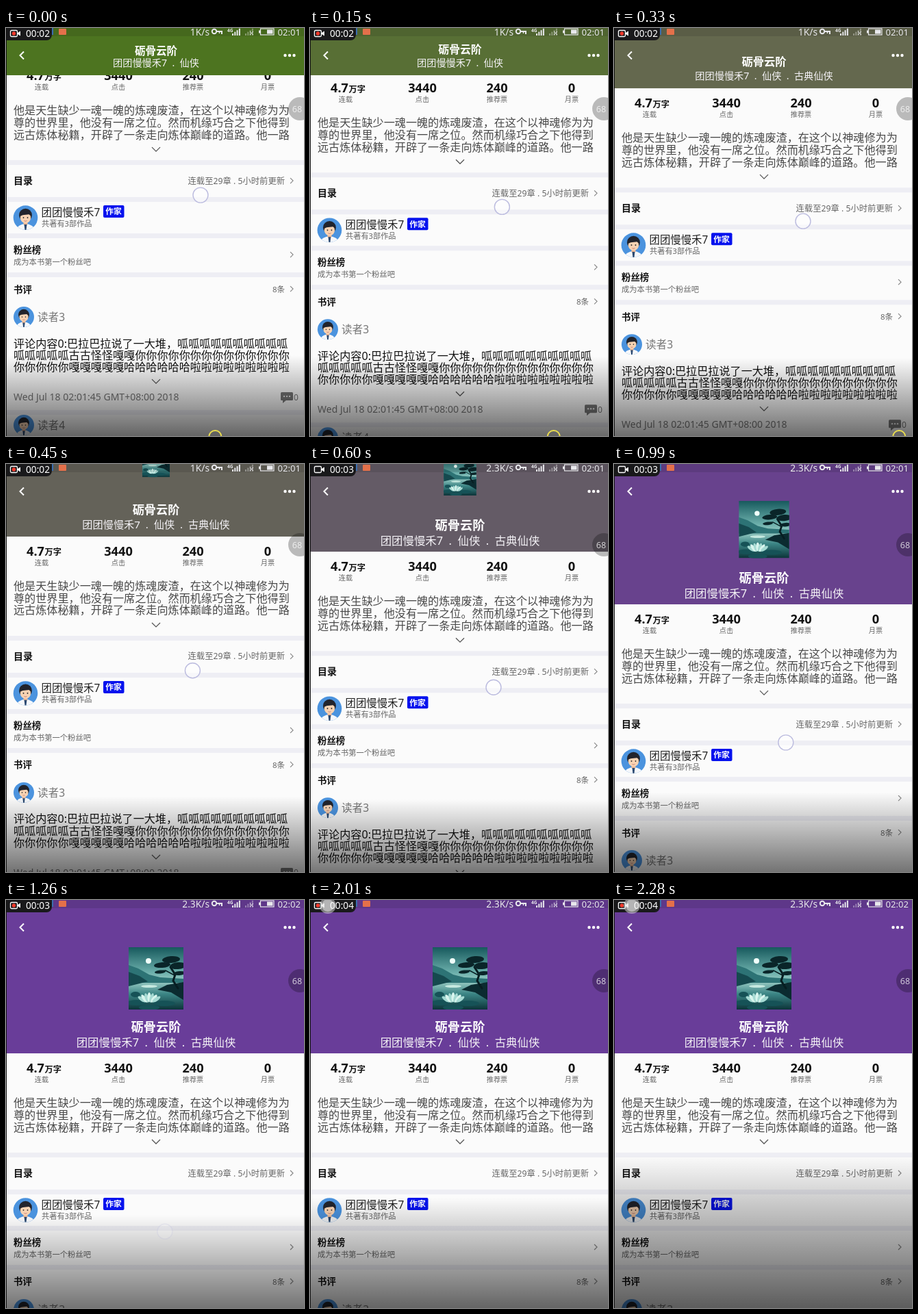
Write an HTML page with a canvas that moves like this. It is 435x596 px and loops after 5580 ms.

```html
<!DOCTYPE html>
<html lang="zh-CN">
<head>
<meta charset="utf-8">
<style>
html, body { margin: 0; width: 100%; height: 100%; overflow: hidden; background: #fbfbfb; }
canvas { display: block; }
</style>
</head>
<body>
<canvas id="stage" width="435" height="596"></canvas>
<script>
const W = 435, H = 596, LOOP = 5580;
const c = document.getElementById('stage').getContext('2d');
const FONT = '"Noto Sans", "Noto Sans CJK SC", "Noto Sans CJK JP", sans-serif';
const TITLE = '砺骨云阶', AUTHOR = '团团慢慢禾7';

// Keyed motion: [time or position, value or list of values]
const SCROLL = [[0, 48], [330, 88], [600, 128], [840, 173], [1080, 224]];
const FINGER = [[0, [284, 244, 1]], [330, [276, 282, 1]], [600, [268, 326, 1]],
  [840, [259, 371, 1]], [1080, [246, 428, 1]], [1260, [232, 484, .25]], [1300, [229, 492, 0]]];
const SHADE = [[0, [478, .6]], [330, [482, .56]], [600, [490, .53]], [840, [490, .54]], [1260, [460, .54]],
  [1980, [455, .56]], [2010, [435, .6]], [2280, [373, .63]]];
const HEADER = [[48, [77, 116, 32]], [88, [100, 104, 78]], [128, [100, 91, 102]],
  [173, [101, 74, 121]], [224, [105, 61, 153]]];
// title size, title rise, subtitle size, subtitle rise
const TITLES = [[48, [15.5, 36, 14.2, 18]], [88, [16.3, 39, 14.2, 18]], [128, [18.2, 39, 16.4, 16]]];

function at(keys, x) {
  const i = keys.findIndex(k => k[0] > x);
  if (i === 0) return keys[0][1];
  if (i < 0) return keys[keys.length - 1][1];
  const [x0, a] = keys[i - 1], [x1, b] = keys[i];
  const mix = (p, q) => p + (q - p) * (x - x0) / (x1 - x0);
  return Array.isArray(a) ? a.map((v, n) => mix(v, b[n])) : mix(a, b);
}

// y is the visual middle of the line
function text(str, x, y, size, color, weight = 400, align = 'left') {
  c.font = `${weight} ${size}px ${FONT}`;
  c.textAlign = align;
  c.fillStyle = color;
  c.fillText(str, x, y + size * .37);
}

function box(x, y, w, h, color, r = 0) {
  c.fillStyle = color;
  c.beginPath();
  c.roundRect(x, y, w, h, r);
  c.fill();
}

function oval(x, y, rx, ry, color, turn = 0) {
  c.fillStyle = color;
  c.beginPath();
  c.ellipse(x, y, rx, ry, turn, 0, 7);
  c.fill();
}

function ring(x, y, r, color, width) {
  c.strokeStyle = color;
  c.lineWidth = width;
  c.beginPath();
  c.arc(x, y, r, 0, 7);
  c.stroke();
}

function line(points, color, width) {
  c.strokeStyle = color;
  c.lineWidth = width;
  c.beginPath();
  points.forEach(p => c.lineTo(...p));
  c.stroke();
}

function poly(points, color) {
  c.fillStyle = color;
  c.beginPath();
  points.forEach(p => c.lineTo(...p));
  c.fill();
}

const downArrow = y => line([[213, y - 3], [219, y + 3], [225, y - 3]], '#555', 1.3);
const rightArrow = y => line([[415, y - 4], [419, y], [415, y + 4]], '#888', 1.2);
const divider = y => box(0, y, W, 7, '#eeeef4');

function avatar(x, y, r) {
  c.save();
  c.translate(x, y);
  c.scale(r / 18, r / 18);
  oval(0, 0, 18, 18, '#4b93de');
  c.clip();
  oval(0, 18, 13, 9, '#f6f8fb');
  box(-3, 4, 6, 7, '#eeb995', 2);
  poly([[-2, 10], [2, 10], [1, 18], [-1, 18]], '#2c4a72');
  oval(0, -4, 9.5, 9.5, '#22242c');
  oval(0, 0, 7.8, 8, '#f8d3b3');
  poly([[-9, -2], [-8, -9], [5, -10], [9, -2], [5, -5], [-4, -4]], '#22242c');
  oval(-3, 0, .9, 1.1, '#333');
  oval(3, 0, .9, 1.1, '#333');
  line([[-2, 4.5], [0, 5.2], [2, 4.5]], '#b66', .8);
  c.restore();
}

function cover(y, scale) {
  c.save();
  c.translate(219, y);
  c.scale(scale, scale);
  c.translate(-40, -45.5);
  c.beginPath();
  c.rect(0, 0, 80, 91);
  c.clip();
  const sky = c.createLinearGradient(0, 0, 0, 91);
  [[0, '#17595d'], [.4, '#6aaeaa'], [.55, '#9acbc4'], [.75, '#3b8585'], [1, '#0c3439']]
    .forEach(s => sky.addColorStop(...s));
  box(0, 0, 80, 91, sky);
  oval(29, 20, 4, 4, '#f0fffa');
  poly([[0, 26], [14, 31], [30, 40], [46, 44], [80, 46], [80, 52], [0, 52]], '#2d7375');
  poly([[0, 36], [16, 42], [28, 50], [0, 57]], '#15494e');
  oval(30, 57, 12, 2, '#c5e8df');
  poly([[80, 51], [56, 55], [42, 62], [62, 66], [80, 77]], '#0b2b30');
  c.lineCap = 'round';
  line([[72, 60], [65, 49], [68, 40], [61, 29]], '#071d21', 3);
  line([[67, 41], [54, 34], [46, 35]], '#071d21', 1.5);
  [[49, 26, 12, 4], [62, 18, 13, 5], [72, 27, 12, 5], [46, 36, 8, 2.5], [74, 38, 9, 3]]
    .forEach(l => oval(...l, '#0a2529', -.08));
  [[12, 81, 14], [52, 82, 16], [30, 88, 15], [10, 69, 7]].forEach(([x, v, r]) => oval(x, v, r, 4, '#165257'));
  for (let i = -3; i <= 3; i++)
    oval(30 + i * 3.5, 73 + Math.abs(i), 2.6, 7, i % 2 ? '#a5dad3' : '#d8f5ee', i * .32);
  c.restore();
}

function content(s) {
  c.save();
  c.translate(0, s);
  [['3440', '点击', 164], ['240', '推荐票', 273], ['0', '月票', 382]].forEach(([n, label, x]) => {
    text(n, x, 21, 18.2, '#111', 700, 'center');
    text(label, x, 38, 10.2, '#666', 400, 'center');
  });
  text('4.7', 30, 21, 18.2, '#111', 700);
  text('万字', 56.5, 23, 12.2, '#111', 700);
  text('连载', 52, 38, 10.2, '#666', 400, 'center');

  ['他是天生缺少一魂一魄的炼魂废渣，在这个以神魂修为为',
   '尊的世界里，他没有一席之位。然而机缘巧合之下他得到',
   '远古炼体秘籍，开辟了一条走向炼体巅峰的道路。他一路']
    .forEach((row, i) => text(row, 11, 72 + i * 17.8, 16.13, '#484848'));
  downArrow(129);

  divider(145);
  text('目录', 11, 175, 14, '#111', 700);
  text('连载至29章 . 5小时前更新', 407, 175, 12.3, '#666', 400, 'right');
  rightArrow(175);

  divider(199);
  avatar(28.5, 229, 17.8);
  text(AUTHOR, 51.5, 221, 15.4, '#222', 500);
  box(142, 211, 30.5, 18, '#0612ee', 2);
  text('作家', 157, 220, 11.8, '#fff', 700, 'center');
  text('共著有3部作品', 52, 237.5, 11.2, '#666');

  divider(252);
  text('粉丝榜', 11, 276, 13.4, '#111', 700);
  text('成为本书第一个粉丝吧', 11, 293.5, 11.3, '#666');
  rightArrow(283);

  divider(309);
  text('书评', 11, 333.5, 13.4, '#111', 700);
  text('8条', 407, 333.5, 11.5, '#666', 400, 'right');
  rightArrow(333);

  avatar(26, 374, 15);
  text('读者3', 46, 374, 15.6, '#777');
  ['评论内容0:巴拉巴拉说了一大堆，' + '呱'.repeat(10),
   '呱'.repeat(5) + '古古怪怪嘎嘎' + '你'.repeat(14),
   '你'.repeat(5) + '嘎'.repeat(5) + '哈'.repeat(6) + '啦'.repeat(9)]
    .forEach((row, i) => text(row, 11, 412.5 + i * 17.3, 16.13, '#111', 500));
  downArrow(468);
  text('Wed Jul 18 02:01:45 GMT+08:00 2018', 11, 491, 14, '#777');
  box(401, 484, 18, 12, '#777', 1.5);
  poly([[404, 495], [410, 495], [404, 500]], '#777');
  [406, 410, 414].forEach(x => oval(x, 490, 1.2, 1.2, '#eee'));
  text('0', 420, 491, 12, '#777');
  divider(510);
  avatar(26, 532, 15);
  text('读者4', 46, 532, 15.6, '#777');
  c.restore();
}

function header(s) {
  const h = Math.max(69, s);
  c.save();
  c.beginPath();
  c.rect(0, 0, W, h);
  c.clip();
  box(0, 0, W, h, `rgb(${at(HEADER, s).map(Math.round)})`);
  const scale = 1 - (224 - s) * .0042;
  if (s > 80) cover(s - 109.5, scale);
  const [size, rise, subSize, subRise] = at(TITLES, s);
  text(TITLE, 219, h - rise, size, '#fff', 700, 'center');
  const parts = [AUTHOR, '仙侠'].concat(s > 69 ? '古典仙侠' : []);
  text(parts.join('  .  '), 219, h - subRise, subSize, '#f4f2f6', 400, 'center');
  c.restore();
  line([[26, 34.5], [20.5, 40], [26, 45.5]], '#fff', 2);
  [407.5, 414, 420.5].forEach(x => oval(x, 40, 2.2, 2.2, '#fff'));
}

function statusBar(t) {
  const ink = '#e8e8ec', late = t >= 570;
  box(0, 0, W, 12, 'rgba(0,0,0,.1)');
  box(58, 0, 11, 10, '#3c6fb0');
  box(77, 1, 11, 9, '#e4704a', 1);
  text(late ? '2.3K/s' : '1K/s', 297, 6, 13.8, ink, 400, 'right');
  ring(304, 5, 3.2, ink, 2);
  line([[307, 5], [315, 5], [315, 9]], ink, 2);
  line([[311.5, 5], [311.5, 8]], ink, 1.5);
  text('4G', 323, 4, 6.5, ink, 700);
  for (let i = 0; i < 4; i++) {
    box(330 + i * 3.3, 8 - i * 2.4, 2, 3 + i * 2.4, ink);
    box(349 + i * 3.3, 8 - i * 2.4, 2, 3 + i * 2.4, 'rgba(255,255,255,.35)');
  }
  line([[356, 5], [361, 10]], ink, 1);
  line([[361, 5], [356, 10]], ink, 1);
  c.strokeStyle = ink;
  c.lineWidth = 1.2;
  c.strokeRect(371.5, 1, 19.5, 9);
  box(369, 3.5, 2, 4, ink);
  box(381, 2.5, 8.5, 6, ink);
  text(t >= 1170 ? '02:02' : '02:01', 430, 6, 13.1, ink, 400, 'right');

  box(-8, -10, 75, 28, '#19191b', 8);
  const clock = t >= 1500 ? 4 : late ? 3 : 2;
  c.strokeStyle = '#fff';
  c.lineWidth = 1.3;
  c.beginPath();
  c.roundRect(6.5, 3.5, 10, 9, 1.5);
  c.stroke();
  poly([[17, 7], [21, 4.5], [21, 11.5], [17, 9]], '#fff');
  if (!late || t >= 1170) oval(11.5, 8, 2.7, 2.7, '#f33a2c');
  if (t >= 1710) {
    oval(26, 8, 12, 12, 'rgba(225,225,225,.5)');
    oval(26, 8, 9, 9, 'rgba(235,235,235,.5)');
  }
  text('00:0' + clock, 29, 8, 13.7, '#fff');
}

function draw(t) {
  const s = at(SCROLL, t);
  box(0, 0, W, H, '#fbfbfb');
  content(s);
  header(s);

  const [top, dark] = at(SHADE, t);
  const shade = c.createLinearGradient(0, top, 0, H);
  shade.addColorStop(0, 'rgba(0,0,0,0)');
  shade.addColorStop(1, `rgba(0,0,0,${dark})`);
  box(0, top, W, H - top, shade);

  oval(429, 118, 17, 17, 'rgba(0,0,0,.26)');
  text('68', 425, 118.5, 12.5, 'rgba(255,255,255,.75)', 400, 'center');
  statusBar(t);

  const [x, y, alpha] = at(FINGER, t);
  c.globalAlpha = alpha;
  oval(x, y, 11, 10.5, 'rgba(255,255,255,.55)');
  ring(x, y, 11, '#bcbcdf', 1.4);
  c.globalAlpha = 1;
  if (t < 450) {
    const sx = 305 + t * .336;
    oval(sx, 597, 9, 9, 'rgba(90,90,90,.5)');
    ring(sx, 597, 9, '#e9dc4e', 2);
  }
  box(0, 0, 1, H, '#111');
}

const start = performance.now();
function tick(now) {
  draw(Math.max(0, now - start) % LOOP);
  requestAnimationFrame(tick);
}
tick(start);
</script>
</body>
</html>
```
